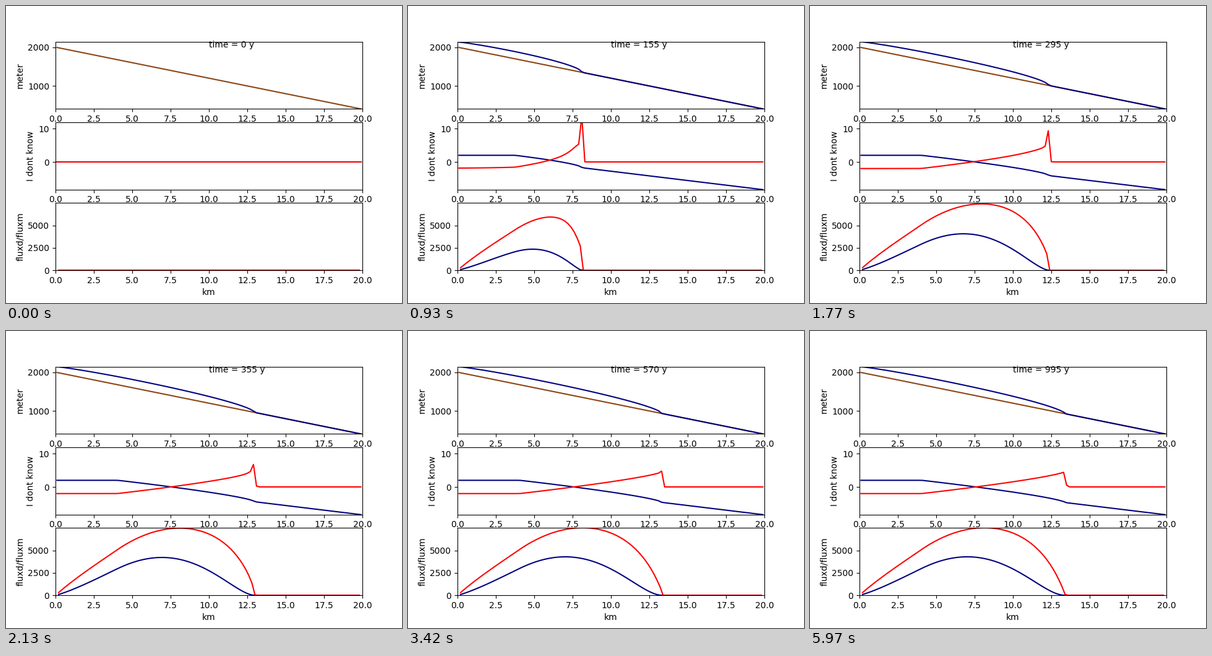
These frames come from a looping animation (640 px wide and 480 px high, 6 s). A matplotlib script:

```python
import numpy as np
import matplotlib.pyplot as plt
from matplotlib.animation import FuncAnimation

# Flowline glacier on a uniform slope (shallow ice + sliding)
N, DX = 100, 200.0
YEAR = 365.25 * 86400
RHO_G = 917 * 9.81
F_DEF = 0.4 * 1.9e-24 * YEAR * RHO_G**3
F_SLIDE = 5.7e-20 * YEAR * RHO_G**3
ELA, GRADIENT, B_MAX = 1600.0, 0.007, 2.0
FRAMES, YEARS_PER_FRAME, DT = 200, 5, 0.02

x = (np.arange(N) + 0.5) * DX
edges = np.arange(1, N) * DX
bed = 2000 - 0.08 * x


def simulate():
    """Return one (surface, balance, divergence, deformation, sliding) per frame."""
    h = np.zeros(N)
    flux = np.zeros(N + 1)
    states = [(np.zeros(N), np.zeros(N), np.zeros(N),
               np.zeros(N - 1), np.zeros(N - 1))]
    for _ in range(FRAMES - 1):
        for _ in range(round(YEARS_PER_FRAME / DT)):
            z = bed + h
            balance = np.minimum(GRADIENT * (z - ELA), B_MAX)
            hm = 0.5 * (h[1:] + h[:-1])
            hm2 = hm * hm
            s = (z[:-1] - z[1:]) / DX
            drive = s * s * s * hm2 * hm
            slide = F_SLIDE * drive
            deform = F_DEF * drive * hm2
            flux[1:-1] = slide + deform
            div = (flux[:-1] - flux[1:]) / DX
            h = np.maximum(h + DT * (balance + div), 0)
        states.append((bed + h, balance, -div, deform, slide))
    return states


states = simulate()

fig, (top, mid, low) = plt.subplots(3, 1, figsize=(6.4, 4.8), dpi=100)

top.plot(x / 1000, bed, color="saddlebrown")
surface, = top.plot([], [], color="navy")
balance, = mid.plot([], [], color="navy")
divergence, = mid.plot([], [], color="red")
deform, = low.plot([], [], color="navy")
slide, = low.plot([], [], color="red")
clock = top.text(10, 2000, "")

for ax, label, limits in [(top, "meter", (408, 2143)),
                          (mid, "I dont know", (-8.344, 11.93)),
                          (low, "fluxd/fluxm", (0, 7488))]:
    ax.set_xlim(0, 20)
    ax.set_ylim(*limits)
    ax.set_ylabel(label)
low.set_xlabel("km")

lines = (surface, balance, divergence, deform, slide)


def update(i):
    z, b, d, fd, fs = states[i]
    # sign convention: ice gained by flow is shown negative where it leaves
    for line, y in zip(lines, (z, b, -d, fd, fs)):
        line.set_data((x if len(y) == N else edges) / 1000, y)
    clock.set_text(f"time = {i * YEARS_PER_FRAME} y")
    return (*lines, clock)


anim = FuncAnimation(fig, update, frames=FRAMES, interval=30,
                     repeat=True, repeat_delay=0, blit=False)
plt.show()
```
